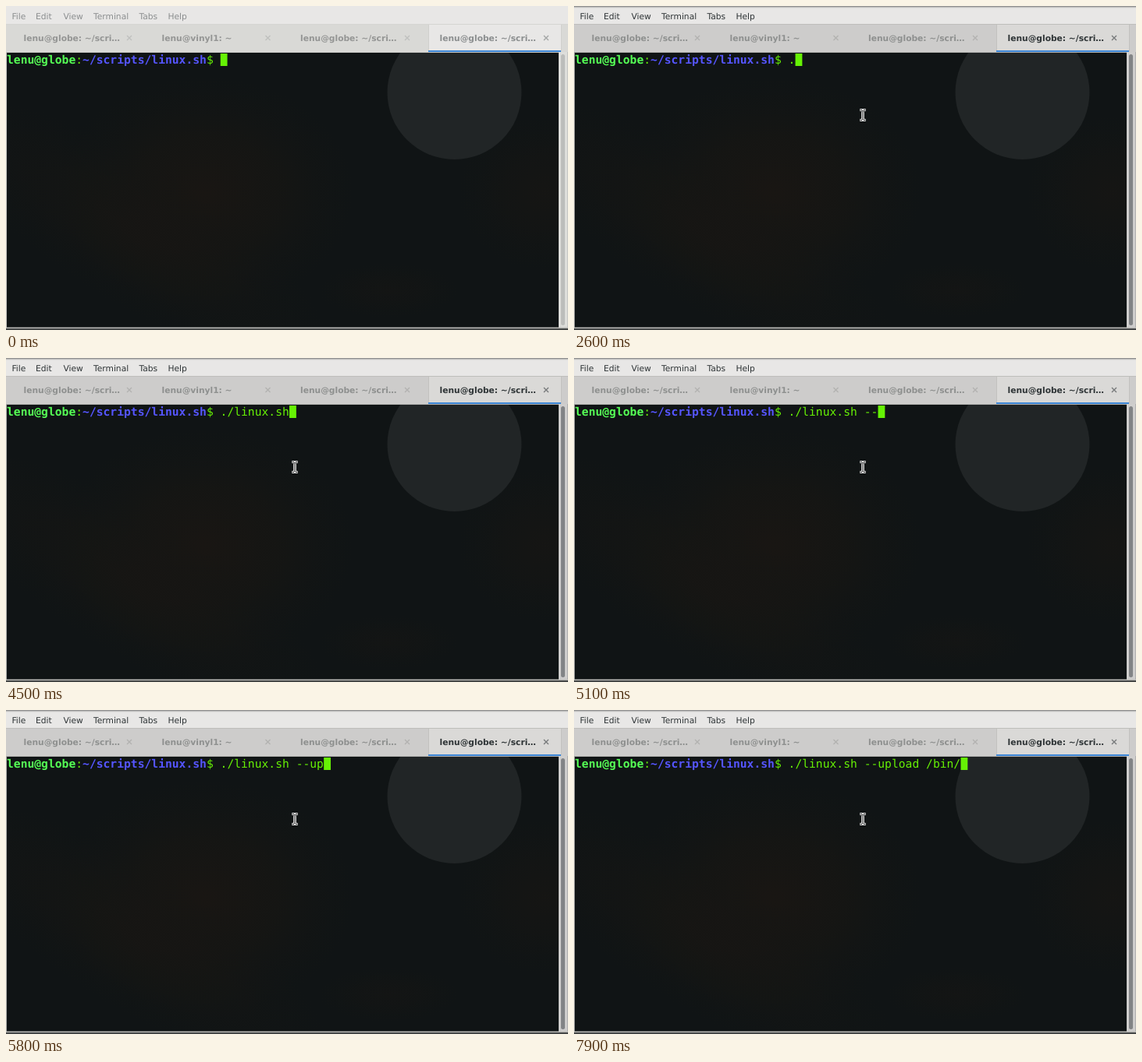
An HTML page for the animation above (8 s loop, 720x416 px).

```html
<!DOCTYPE html>
<html lang="en">
<head>
<meta charset="utf-8">
<title>Terminal session</title>
<style>
  html, body { margin: 0; width: 100%; height: 100%; overflow: hidden; background: #101415; }
  svg { display: block; width: 720px; height: 416px; }
  text { text-rendering: geometricPrecision; white-space: pre; }
  .ui { font: 10.7px "DejaVu Sans", sans-serif; }
  .tab { font-weight: bold; }
  .term { font: 14.667px "DejaVu Sans Mono", monospace; fill: #66f005; }
  .user { font-weight: bold; fill: #55ff55; }
  .path { font-weight: bold; fill: #5555ff; }
  .close { fill: none; stroke-width: 1.4; }
</style>
</head>
<body>
<svg viewBox="0 0 720 416" xmlns="http://www.w3.org/2000/svg">
  <defs>
    <radialGradient id="warm">
      <stop offset="0" stop-color="#191613"/>
      <stop offset="0.5" stop-color="#171613" stop-opacity="0.7"/>
      <stop offset="1" stop-color="#141614" stop-opacity="0"/>
    </radialGradient>
    <linearGradient id="shade" x2="0" y2="1">
      <stop offset="0" stop-color="#777"/>
      <stop offset="1" stop-color="#aaa" stop-opacity="0"/>
    </linearGradient>
    <clipPath id="screen"><rect x="1" y="60" width="707" height="353"/></clipPath>
  </defs>

  <rect id="frame" width="720" height="416"/>
  <rect id="menubar" width="720" height="23"/>
  <rect id="edge" y="23" width="720" height="1"/>
  <rect id="tabbar" y="24" width="720" height="35"/>
  <rect id="active" x="541" y="24" width="170" height="34"/>
  <path id="divider" d="M541.5 24V58M711.5 24V58" stroke-width="1"/>
  <rect x="541" y="57" width="170" height="2" fill="#3c86d6"/>
  <rect id="shadow" width="720" height="3" fill="url(#shade)"/>
  <g id="labels"></g>

  <g clip-path="url(#screen)">
    <rect y="59" width="720" height="357" fill="#101415"/>
    <ellipse cx="255" cy="240" rx="190" ry="150" fill="url(#warm)"/>
    <ellipse cx="160" cy="290" rx="290" ry="90" fill="url(#warm)" opacity="0.55" transform="rotate(32 160 290)"/>
    <ellipse cx="690" cy="240" rx="110" ry="100" fill="url(#warm)" opacity="0.6"/>
    <ellipse cx="490" cy="365" rx="90" ry="35" fill="url(#warm)" opacity="0.4"/>
    <circle cx="574.5" cy="111" r="86" fill="#212526"/>
  </g>

  <rect id="trough" x="708" y="59" width="11" height="354"/>
  <rect id="thumb" x="711" y="62" width="5" height="348" rx="2.5"/>
  <rect y="412.5" width="720" height="1.5" fill="#b9b9b6"/>
  <rect y="414" width="720" height="2" fill="#454747"/>

  <text class="term" x="1" y="74"><tspan class="user">lenu@globe</tspan>:<tspan class="path">~/scripts/linux.sh</tspan>$ <tspan id="typed"></tspan></text>
  <rect id="caret" y="61" width="8.83" height="16" fill="#66f205"/>

  <g id="pointer" fill="none">
    <path id="beam" d="M-3.5-6.5H-1L0-5.5 1-6.5H3.5M0-5.5V5.5M-3.5 6.5H-1L0 5.5 1 6.5H3.5" stroke="#fff" stroke-width="3"/>
    <use href="#beam" style="stroke:#000"/>
    <path d="M-3.5-6.5H-1L0-5.5 1-6.5H3.5M0-5.5V5.5M-3.5 6.5H-1L0 5.5 1 6.5H3.5" stroke="#111" stroke-width="1"/>
  </g>
</svg>
<script>
const LOOP = 8000, CELL = 8.83, PROMPT_END = 1 + 31 * CELL;
const COMMAND = "./linux.sh --upload /bin/";
// One key time per character of the command.
const KEYS = [
  2600, 2700,
  3100, 3200, 3400, 3500, 3700,
  4100, 4300, 4500, 4700, 4900, 5000,
  5700, 5800, 5900, 6100,
  6700, 6800, 6900, 7100,
  7300, 7500, 7700, 7900
];
const $ = id => document.getElementById(id);
const labels = $("labels");
const tints = [];

// Registers a colour that runs from the unfocused to the focused state.
function tint(el, attr, idle, focused) {
  const rgb = hex => [1, 3, 5].map(i => parseInt(hex.slice(i, i + 2), 16));
  tints.push({ el, attr, a: rgb(idle), b: rgb(focused) });
}

function add(tag, attrs, text = "") {
  const el = document.createElementNS("http://www.w3.org/2000/svg", tag);
  for (const key in attrs) el.setAttribute(key, attrs[key]);
  el.textContent = text;
  labels.append(el);
  return el;
}

const menu = [["File", 7.5], ["Edit", 38], ["View", 73.5], ["Terminal", 112], ["Tabs", 170.5], ["Help", 207.5]];
for (const [name, x] of menu) {
  tint(add("text", { class: "ui", x, y: 16.5 }, name), "fill", "#8b8e8f", "#2e3436");
}

const long = "lenu@globe: ~/scri…";
const tabs = [[long, 22.5, 158], ["lenu@vinyl1: ~", 199.5, 335.5], [long, 377, 514], [long, 555.5, 692]];
tabs.forEach(([name, x, cx], i) => {
  const current = i === 3;
  const title = add("text", { class: "ui tab", x, y: 45 }, name);
  const cross = add("path", { class: "close", d: `M${cx - 3} 38l6 6m0-6l-6 6` });
  tint(title, "fill", current ? "#8b8e8f" : "#949594", current ? "#2e3436" : "#8e908f");
  tint(cross, "stroke", current ? "#a3a5a5" : "#bfc0be", current ? "#777a7b" : "#b2b2b0");
});

tint($("frame"), "fill", "#c6c6c3", "#b0b0ae");
tint($("menubar"), "fill", "#e8e7e6", "#e8e7e6");
tint($("edge"), "fill", "#d5d5d2", "#bebebb");
tint($("tabbar"), "fill", "#d9d9d6", "#cdcccb");
tint($("active"), "fill", "#e8e7e6", "#dad9d7");
tint($("divider"), "stroke", "#d0d0cd", "#c2c1bf");
tint($("trough"), "fill", "#dededb", "#cfcecd");
tint($("thumb"), "fill", "#bcbdbb", "#828486");

const progress = (t, from, to) => Math.min(1, Math.max(0, (t - from) / (to - from)));
const easeOut = p => 1 - (1 - p) ** 3;

function draw(time) {
  const t = Math.floor(time / 100) * 100;

  const focus = easeOut(progress(t, 200, 600));
  for (const { el, attr, a, b } of tints) {
    el.setAttribute(attr, `rgb(${a.map((v, i) => Math.round(v + (b[i] - v) * focus))})`);
  }
  $("shadow").setAttribute("opacity", focus);

  const move = easeOut(progress(t, 100, 700));
  $("pointer").setAttribute("transform", `translate(${370 + 60 * (1 - move)} ${140 + 290 * (1 - move)})`);
  $("pointer").setAttribute("visibility", t > 100 ? "visible" : "hidden");

  const count = KEYS.filter(key => key <= t).length;
  $("typed").textContent = COMMAND.slice(0, count);
  $("caret").setAttribute("x", PROMPT_END + count * CELL);
}

function tick() {
  draw(performance.now() % LOOP);
  requestAnimationFrame(tick);
}
tick();
</script>
</body>
</html>
```
